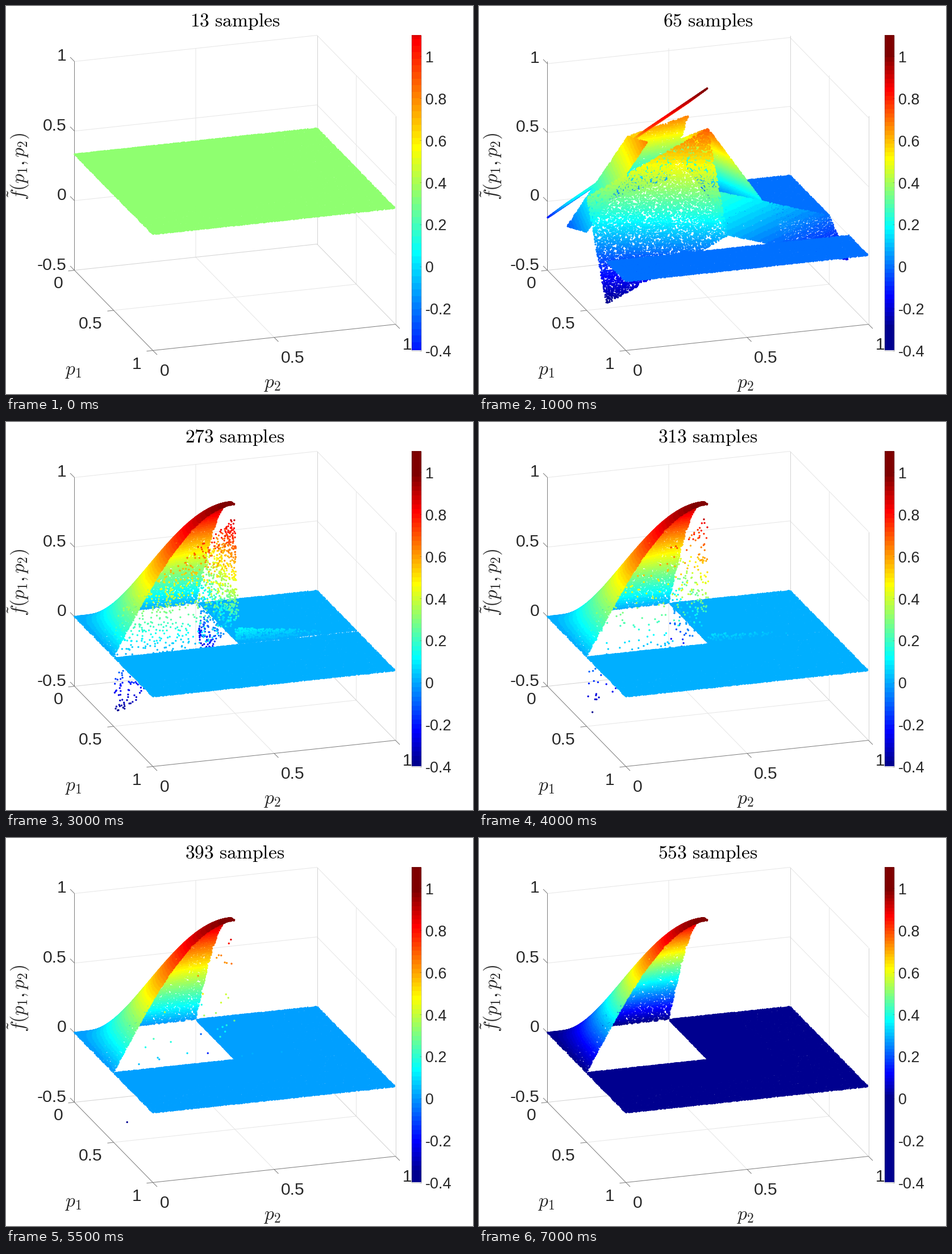
A matplotlib script that plays this animation: 822 by 682 pixels, repeating every 7.5 s.

```python
import numpy as np
import matplotlib.pyplot as plt
from matplotlib.animation import FuncAnimation
from matplotlib.colors import ListedColormap, Normalize

W, H, DPI = 822, 682, 64
PT = 72 / DPI                       # points per pixel
INK, AXIS, EDGE, GRID = "#262626", "#7c7c7c", "#d2d2d2", "#e6e6e6"
COUNTS = [13, 29, 65, 145, 233, 253, 273, 293, 313, 333, 363, 393, 433, 493, 553]
LAST = len(COUNTS) - 1
Z_LOW, Z_SPAN = -0.5, 367           # lower z limit, axis height in pixels

plt.rcParams["font.family"] = "Liberation Sans"
plt.rcParams["mathtext.fontset"] = "cm"
plt.rcParams["axes.unicode_minus"] = False

fig = plt.figure(figsize=(W / DPI, H / DPI), dpi=DPI, facecolor="white")
ax = fig.add_axes([0, 0, 1, 1])
ax.axis("off")

t = 4 * np.arange(1, 65) / 64
jet = ListedColormap(np.stack([np.clip(1.5 - abs(t - c), 0, 1) for c in (3, 2, 1)], 1))
norm = Normalize(-0.4, 1.1)


def project(p1, p2, z, top=1.0):
    """Orthographic view of the box, in pixels."""
    rise = (z - Z_LOW) / (top - Z_LOW) * Z_SPAN
    return 120 + 138 * p1 + 427 * p2, 464 + 141 * p1 - 46 * p2 - rise


def line(points, color, width=1.0, **kw):
    return ax.plot(*zip(*points), color=color, lw=width * PT,
                   solid_capstyle="butt", **{"zorder": 1, **kw})[0]


def label(x, y, text, size=30, **kw):
    opts = dict(ha="center", va="center_baseline", color=INK, zorder=5)
    return ax.text(x, y, text, fontsize=size * PT, **{**opts, **kw})


def cell_fit(p, h):
    """Mean and linear part of sin(pi p) on cells of width h."""
    a = np.floor(p / h) * h
    b = a + h
    mean = (np.cos(np.pi * a) - np.cos(np.pi * b)) / (np.pi * h)
    slope = (np.sin(np.pi * b) - np.sin(np.pi * a)) / h
    return mean, slope * (p - a - h / 2)


def surface(n):
    """Approximation after n refinements: planes on cells of width 2^-n."""
    if n == 0:
        return np.full(p1.shape, 1 / 3)
    h = 2.0 ** -(n if n < LAST else 24)
    m1, d1 = cell_fit(p1, h)
    m2, d2 = cell_fit(p2, h)
    hump = (m1 * m2 + d1 * m2 + m1 * d2) * (1 - 0.8 * h * h)

    def jump(p, q):
        u = (p - 0.5) / h
        ramp = 0.3 + 0.1 * h - (0.735 - 0.4 * h) * u + (1.25 - 1.8 * h) * q
        return np.where(u < 1, ramp, 0)

    u = (p1 - 0.5) / h
    corner = 0.28 * 0.8 ** (n - 2) * (1 - 0.65 * u - 2 * (p2 - 0.5))
    corner = np.where(u < 1, corner, 0)
    low1, low2 = p1 < 0.5, p2 < 0.5
    return np.select([low1 & low2, low2, low1],
                     [hump, jump(p1, p2), jump(p2, p1)], corner)


def scatter_points():
    """Random points near the hump, a jittered grid on the flat rest."""
    rng = np.random.default_rng(7)
    inner = rng.uniform(0, 0.75, (48000, 2))
    rows, cols = 120, 230
    i, j = np.mgrid[:rows, :cols]
    outer = np.stack([(i + rng.random(i.shape)) / rows,
                      (j + rng.random(j.shape)) / cols], -1).reshape(-1, 2)
    outer = outer[(outer > 0.75).any(1)]
    return np.vstack([inner, outer]).T


# Fixed grid lines and box edges
half_wall = [(0, 0.5, 1), (0, 0.5, Z_LOW), (1, 0.5, Z_LOW)]
half_side = [(0.5, 1, 1), (0.5, 1, Z_LOW), (0.5, 0, Z_LOW)]
for path in (half_wall, half_side):
    line([project(*p) for p in path], GRID)
levels = [line([(0, 0)], GRID) for _ in range(3)]
back = [(0, 0, Z_LOW), (0, 1, Z_LOW), (1, 1, Z_LOW)]
for path in (back, [(0, 1, 1), back[1]], [(1, 1, 1), back[2]]):
    line([project(*p) for p in path], EDGE)
line([project(*p) for p in [(0, 0, 1), (0, 0, Z_LOW), (1, 0, Z_LOW), (1, 1, Z_LOW)]], AXIS)

# Ticks and tick labels
for v in (0, 0.5, 1):
    x, y = project(v, 0, Z_LOW)
    line([(x, y), (x - 11, y + 1.2)], AXIS)
    label(x - 20, y + 21, f"{v:g}", ha="right")
    x, y = project(1, v, Z_LOW)
    line([(x, y), (x + 7.5, y + 7.5)], AXIS)
    label(x + 12, y + 33.5, f"{v:g}", ha="left")
Z_TICKS = (-0.5, 0, 0.5, 1)
z_marks = [line([(0, 0)], AXIS) for _ in Z_TICKS]
z_labels = [label(106, 0, f"{v:g}", ha="right") for v in Z_TICKS]

# Titles
title = label(402.5, 36, "", 33.6, va="baseline", color="black")
label(117, 641, "$p_1$", 33.6, va="center")
label(468, 664, "$p_2$", 33.6, va="center")
label(22, 281.5, r"$\tilde{f}(p_1,p_2)$", 33.6, va="center", rotation=90)

# Colour bar
ax.imshow(np.linspace(-0.4, 1.1, 554)[:, None], cmap=jet, norm=norm, origin="lower",
          extent=(713, 730, 605, 51), aspect="auto", interpolation="nearest", zorder=6)
line([(713, 51), (730, 51), (730, 605), (713, 605), (713, 51)], INK, 0.5,
     alpha=0.5, zorder=7)
for v in np.arange(-2, 6) / 5:
    y = 605 - (v + 0.4) * 554 / 1.5
    line([(727, y), (730, y)], INK, 0.5, alpha=0.5, zorder=7)
    label(737.5, y + 0.5, f"{v:g}", 27, ha="left")

p1, p2 = scatter_points()
dots = ax.scatter(p1, p2, c=p1, cmap=jet, norm=norm, marker=(8, 0, 0),
                  s=(3.5 * PT) ** 2, linewidths=0, zorder=3)
# Whole coordinates fall on pixel centres
ax.set_xlim(-0.5, W - 0.5)
ax.set_ylim(H - 0.5, -0.5)


def update(n):
    z = surface(n)
    top = max(1.0, z.max())
    if n == 0:
        norm.vmin, norm.vmax = z[0] - 1.01, z[0] + 1
    else:
        norm.vmin, norm.vmax = z.min(), z.max()

    order = np.argsort(p1 - 0.323 * p2 + 0.637 * z)
    dots.set_offsets(np.column_stack(project(p1, p2, z, top))[order])
    dots.set_array(z[order])

    for grid, v in zip(levels, Z_TICKS[1:]):
        grid.set_data(*zip(*(project(*p, v, top) for p in [(0, 0), (0, 1), (1, 1)])))
    for mark, text, v in zip(z_marks, z_labels, Z_TICKS):
        x, y = project(0, 0, v, top)
        mark.set_data([x - 7.5, x], [y - 7.5, y])
        text.set_y(y - 12)
    title.set_text(rf"$\mathrm{{{COUNTS[n]}\ samples}}$")


anim = FuncAnimation(fig, update, frames=len(COUNTS), interval=500,
                     init_func=lambda: None, repeat=True, repeat_delay=0)
plt.show()
```
